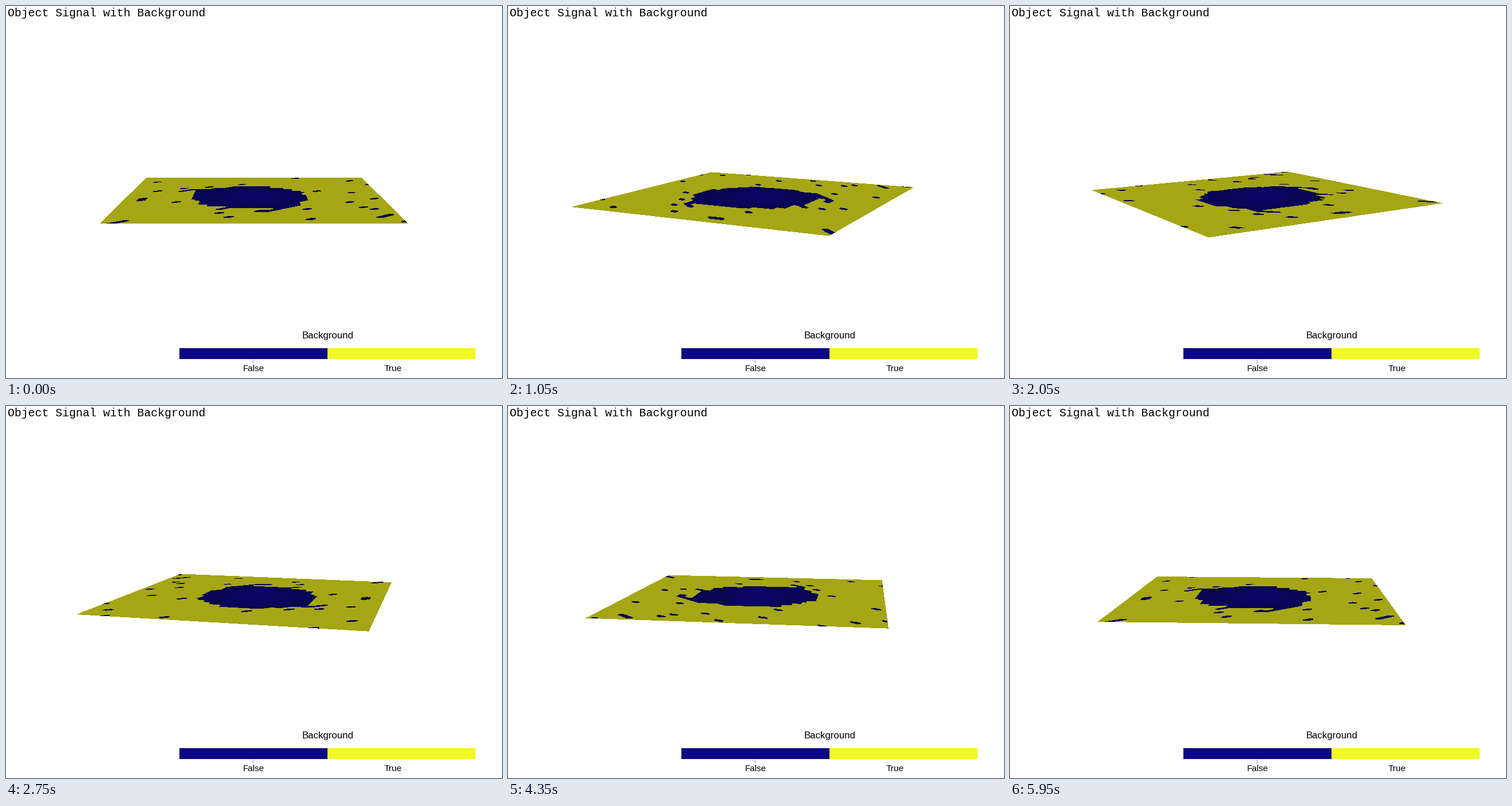
Recreate the animation shown at these times as a matplotlib script. Size 864 px wide and 648 px high, loop 6 s.

```python
import numpy as np
import matplotlib.pyplot as plt
from matplotlib.animation import FuncAnimation
from matplotlib.collections import PolyCollection
from matplotlib.patches import Rectangle

W, H, DPI = 864, 648, 100
FRAMES, INTERVAL = 120, 50
BLUE = np.array([13, 8, 135]) / 255
YELLOW = np.array([240, 249, 33]) / 255

# Camera: 30 degree view angle, unit half-side plane
FOCAL = H / 2 / np.tan(np.radians(15))
DIST, COS_E, SIN_E, DROP = 5.481, 0.9855, 0.1704, 0.0341

N = 30
STEP = 2 / (N - 1)

# Object rows: first column and last column, from row 8 upwards
ROWS = [(12, 18), (10, 19), (9, 19), (9, 19), (9, 20), (8, 20), (8, 20),
        (8, 20), (8, 18), (8, 20), (8, 18), (7, 17), (10, 17), (12, 16)]
SPOTS = [(5, 29), (2, 25), (3, 18), (2, 12), (2, 13), (6, 18), (6, 20),
         (9, 21), (6, 11), (20, 28), (26, 29), (27, 26), (29, 23), (22, 18),
         (26, 17), (25, 11), (28, 13), (26, 8), (27, 7), (20, 7), (20, 2),
         (27, 3), (28, 4), (29, 1), (1, 0), (2, 1), (12, 3), (11, 5),
         (11, 7), (15, 6), (16, 6), (17, 7), (13, 23)]

mask = np.zeros((N, N))
for row, (lo, hi) in enumerate(ROWS, 8):
    mask[lo:hi + 1, row] = 1
for col, row in SPOTS:
    mask[col, row] = 1


def direction(elev, azim):
    e, a = np.radians([elev, azim])
    return np.array([np.cos(e) * np.sin(a), np.sin(e), np.cos(e) * np.cos(a)])


# Key, head, fill and two back lights, in camera space
LIGHTS = [(direction(50, 10), 0.75 * np.array([1, 0.965, 0.9])),
          (direction(0, 0), 0.25 * np.ones(3)),
          (direction(-75, 0), 0.25 * np.ones(3)),
          (direction(0, 110), 0.21 * np.ones(3)),
          (direction(0, -110), 0.21 * np.ones(3))]


def shade(normals, base):
    light = sum(np.clip(normals @ d, 0, None)[..., None] * c
                for d, c in LIGHTS)
    return np.clip(light * base, 0, 1)


FLAT = np.array([0, COS_E, SIN_E])
FLAT_BLUE, FLAT_YELLOW = shade(FLAT, BLUE), shade(FLAT, YELLOW)


def spin(u, v, angle):
    c, s = np.cos(angle), np.sin(angle)
    return u * c - v * s, u * s + v * c


def hump_triangles():
    axis = np.linspace(-1, 1, N)
    u, v = np.meshgrid(axis, axis, indexing="ij")
    z = 0.068 * np.exp(-((u + 0.01) ** 2 + v ** 2) / (2 * 0.145 ** 2))
    z[z < 0.002] = 0
    pts = np.stack([u, v, z], axis=-1)
    tris = []
    for i in range(N - 1):
        for j in range(N - 1):
            a, b = pts[i, j], pts[i + 1, j]
            c, d = pts[i + 1, j + 1], pts[i, j + 1]
            tris += [t for t in ((a, b, c), (a, c, d))
                     if max(p[2] for p in t) > 0]
    return np.array(tris)


TRIS = hump_triangles()
NORMALS = np.cross(TRIS[:, 1] - TRIS[:, 0], TRIS[:, 2] - TRIS[:, 0])
NORMALS /= np.linalg.norm(NORMALS, axis=1, keepdims=True)

# Ground position seen through each pixel of the moving area
X0, X1, Y0, Y1 = 100, 764, 284, 410
px, py = np.meshgrid(np.arange(X0, X1) + 0.5, np.arange(Y0, Y1) + 0.5)
q = (H / 2 - py) / FOCAL
GROUND_V = (DROP + q * DIST) / (SIN_E - q * COS_E)
GROUND_U = (px - W / 2) / FOCAL * (DIST + GROUND_V * COS_E)


def ground(angle):
    u, v = spin(GROUND_U, GROUND_V, -angle)
    inside = (abs(u) <= 1) & (abs(v) <= 1)
    a = np.clip((u + 1) / STEP, 0, N - 1.001)
    b = np.clip((v + 1) / STEP, 0, N - 1.001)
    i, j = a.astype(int), b.astype(int)
    fa, fb = a - i, b - j
    corner = np.where(fa >= fb, mask[i + 1, j], mask[i, j + 1])
    low, high = np.minimum(fa, fb), np.maximum(fa, fb)
    value = (mask[i, j] * (1 - high) + corner * (high - low)
             + mask[i + 1, j + 1] * low)
    img = np.ones(u.shape + (3,))
    img[inside] = FLAT_YELLOW
    img[inside & (value > 0.5)] = FLAT_BLUE
    return img


def hump(angle):
    u, v = spin(TRIS[..., 0], TRIS[..., 1], angle)
    z = TRIS[..., 2]
    depth = DIST + v * COS_E - z * SIN_E
    x = W / 2 + FOCAL * u / depth
    y = H / 2 - FOCAL * (v * SIN_E - DROP + z * COS_E) / depth
    nu, nv = spin(NORMALS[:, 0], NORMALS[:, 1], angle)
    nz = NORMALS[:, 2]
    cam = np.stack([nu, nv * SIN_E + nz * COS_E, nz * SIN_E - nv * COS_E],
                   axis=-1)
    order = np.argsort(-depth.mean(axis=1))
    return np.stack([x, y], axis=-1)[order], shade(cam, BLUE)[order]


fig = plt.figure(figsize=(W / DPI, H / DPI), dpi=DPI, facecolor="white")
ax = fig.add_axes([0, 0, 1, 1])
ax.axis("off")

floor = ax.imshow(ground(0), extent=(X0, X1, Y1, Y0), aspect="auto",
                  interpolation="nearest", zorder=1)
facets = PolyCollection([], antialiased=False, linewidths=0.6, zorder=2)
ax.add_collection(facets)
ax.set_xlim(0, W)
ax.set_ylim(H, 0)


def label(x, y, text, px_size, font="Liberation Sans", ha="center"):
    ax.text(x, y, text, fontsize=px_size * 72 / DPI, family=font, ha=ha,
            va="baseline", color="black")


label(3, 18, "Object Signal with Background", 19.75, "Liberation Mono", "left")
label(561, 579, "Background", 16.8)
label(431, 636, "False", 15.2)
label(674.5, 636, "True", 15.2)

for x, width, color, tick, tint in (
        (302, 257.5, BLUE, 430, (0.6, 0.59, 0.8)),
        (559.5, 258, YELLOW, 688, (0.97, 0.98, 0.65))):
    ax.add_patch(Rectangle((x, 596), width, 19, fc=color, lw=0))
    ax.add_patch(Rectangle((tick, 616), 1, 7, fc=tint, lw=0))


def update(k):
    angle = 2 * np.pi * k / FRAMES
    floor.set_data(ground(angle))
    verts, colors = hump(angle)
    facets.set_verts(verts)
    facets.set_facecolor(colors)
    facets.set_edgecolor(colors)
    return floor, facets


anim = FuncAnimation(fig, update, frames=FRAMES, interval=INTERVAL,
                     repeat=True, repeat_delay=0)
plt.show()
```
